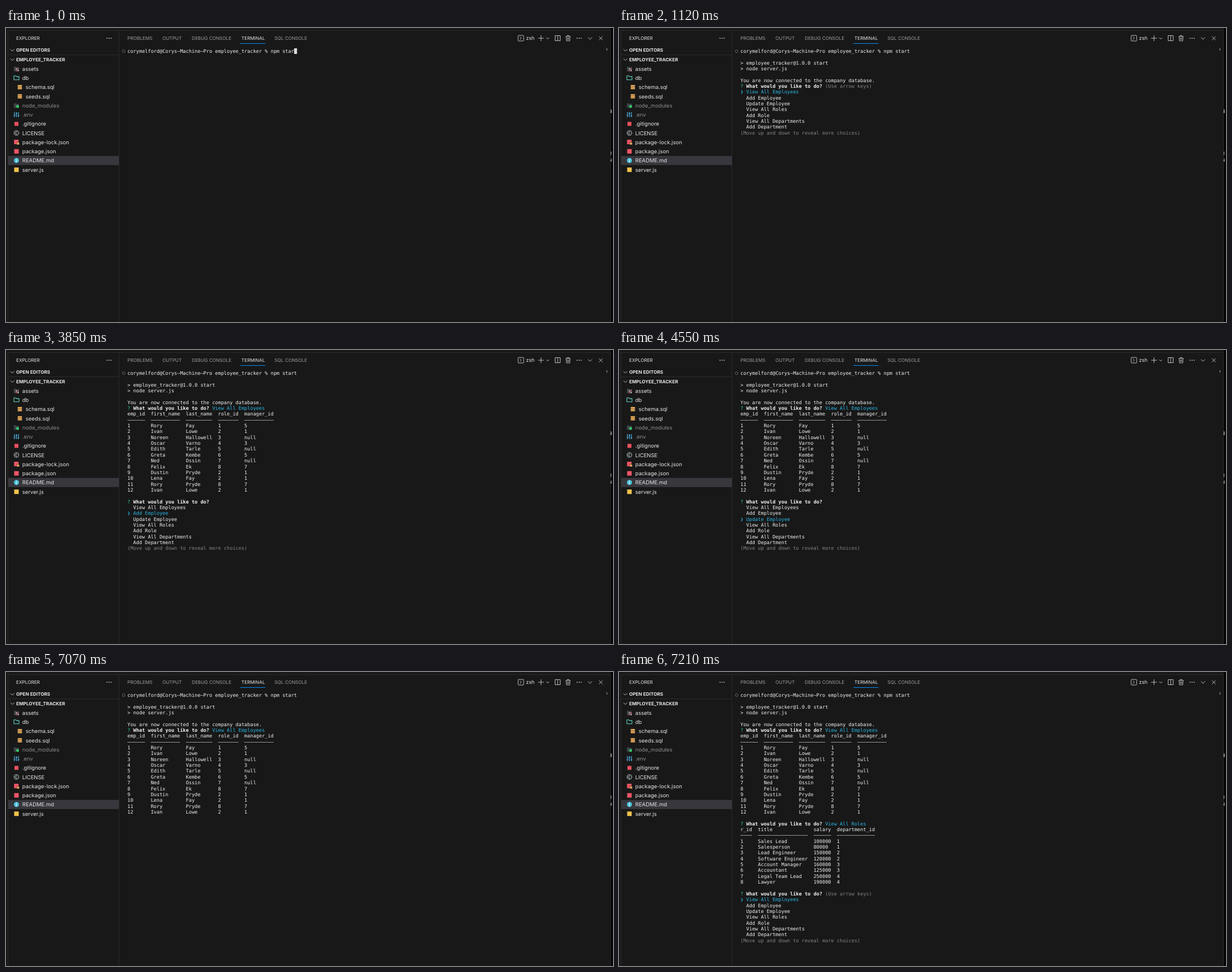
Animation of 1075 by 521 pixels, one loop 8 s. Source, as an HTML page:

```html
<!DOCTYPE html>
<html lang="en">
<head>
<meta charset="utf-8">
<title>Employee tracker terminal</title>
<style>
  html, body { margin: 0; width: 100%; height: 100%; overflow: hidden; background: #181818; }
  body { position: relative; text-rendering: geometricPrecision; }
  svg { position: absolute; left: 0; top: 0; }
  /* the tiny rotations keep baselines from snapping to whole pixels */
  svg text { font: 8.2px Inter, "Open Sans", sans-serif; fill: #e6e6e6; transform: rotate(.003deg); }
  svg .file { font-size: 9.5px; }
  svg .dim { fill: #8c8c8c; }
  svg .tab { fill: #9d9d9d; }
  svg .head { font-weight: 700; }
  .line { fill: none; stroke: #d0d0d0; stroke-width: .9; }
  .edge { fill: none; stroke: #2b2b2b; }
  pre {
    position: absolute; left: 215.2px; top: 35.8px; margin: 0; color: #f2f2f2;
    font: 43px/51.785px "DejaVu Sans Mono", monospace; font-variant-ligatures: none;
    transform: rotate(.003deg) scale(.2); transform-origin: 0 0;
  }
  .green { color: #23d18b; }
  .cyan { color: #29b8e8; }
  .gray { color: #858585; }
  .cursor { background: #dcdcdc; }
</style>
</head>
<body>
<svg width="1075" height="521" viewBox="0 0 1075 521">
  <rect x="1071" width="4" height="521" fill="#050505"/>
  <path class="edge" d="M3 4.5H1071M3.5 4V521M200 5V521M1070.5 4V521M4 47.5H200"/>
  <rect x="4" y="226.7" width="196" height="16.2" fill="#37373d"/>

  <text x="18" y="21.2">EXPLORER</text>
  <text class="head" x="18" y="42.3">OPEN EDITORS</text>
  <text class="head" x="18" y="58.9">EMPLOYEE_TRACKER</text>
  <path class="line" d="M8 37.7l3.3 3.3 3.3-3.3M8 54.3l3.3 3.3 3.3-3.3"/>
  <g id="files"></g>

  <!-- file icons -->
  <path d="M14 68.5h3.5l1 1H23v7h-9z M14 133.5h3.5l1 1H23v7h-9z" fill="#3c4448"/>
  <path d="M17.5 71.5h2v2h-2zM20.5 74.5h2v2h-2z" fill="#d8d8d8"/>
  <path d="M20.5 71.5h2v2h-2zM17.5 74.5h2v2h-2z" fill="#e0566b"/>
  <path d="M14 84.7h3.4l1.2 1.4H23v5.7h-9z" fill="none" stroke="#62d6c6" stroke-width="1.1"/>
  <g id="disks" fill="#f2b35e"></g>
  <circle cx="20.5" cy="139" r="2.5" fill="#35c96b"/>
  <path d="M15 149v9M18.5 149v9M22 149v9M13.5 155h3M17 151.5h3M20.5 155.5h3" fill="none" stroke="#4fb4e6" stroke-width="1.2"/>
  <rect x="15" y="166.4" width="7" height="7" fill="#e9505f"/>
  <circle cx="18.5" cy="186" r="4.1" fill="none" stroke="#c9d3da"/>
  <path d="M20 184.8a2 2 0 1 0 0 2.6" fill="none" stroke="#c9d3da"/>
  <rect x="14.3" y="198" width="8" height="8" fill="#ee5468"/>
  <path d="M19 203.2h4.5v3.6H19zM20 203v-1.2h2.5v1.2" fill="#f2b35e" stroke="#181818" stroke-width=".4"/>
  <rect x="14.5" y="214.6" width="8" height="8" fill="#ee5468"/>
  <circle cx="18.5" cy="234.8" r="4.5" fill="#4dc3dc"/>
  <path d="M18.8 231.8v1.1M18.6 233.8l-.4 3.6" stroke="#fff" stroke-width="1.1"/>
  <rect x="14.5" y="247.2" width="8" height="8" fill="#f0c24c"/>

  <!-- panel tabs -->
  <text class="tab" x="215" y="21.2">PROBLEMS</text>
  <text class="tab" x="277" y="21.2">OUTPUT</text>
  <text class="tab" x="329" y="21.2">DEBUG CONSOLE</text>
  <text x="417" y="21.2">TERMINAL</text>
  <text class="tab" x="475.5" y="21.2">SQL CONSOLE</text>
  <rect x="415" y="26.9" width="44.5" height="1.1" fill="#0a84e0"/>

  <!-- toolbar -->
  <g id="dots" fill="#d0d0d0"></g>
  <rect class="line" x="907" y="13.2" width="9.8" height="9.8" rx="1"/>
  <path class="line" d="M910.2 15.7l2.6 2.4-2.6 2.4"/>
  <text x="921" y="21.2" style="font-size:9px">zsh</text>
  <path class="line" d="M942.5 18.1h10M947.5 13.1v10M956.8 17l2.6 2.6 2.6-2.6"/>
  <path class="line" d="M972.5 13.5h9v9h-9zM977 13.5v9"/>
  <path class="line" d="M991 15h9M994 15v-1.6h3V15M992 15l.6 7.8h5.8L999 15M994.5 17v4M996.5 17v4"/>
  <path class="line" d="M1030.7 16.5l3.6 3.6 3.6-3.6M1050.2 15l6.4 6.4M1056.6 15l-6.4 6.4"/>
  <rect x="1063.2" y="36" width="2" height="4" fill="#666"/>
  <path d="M1071.5 144v4.5M1070 149h3M1072 145v6M1071.5 219v6M1070 235h3M1072 231v6" fill="none" stroke="#a8a8a8"/>
  <circle cx="208.4" cy="41" r="2.4" fill="none" stroke="#777" stroke-width=".8"/>
</svg>
<pre id="term"></pre>

<script>
const $ = id => document.getElementById(id);

// Sidebar rows: name, indent, dimmed
const files = [
  ['assets'], ['db'], ['schema.sql', 6], ['seeds.sql', 6], ['node_modules', 0, 1], ['.env', 0, 1],
  ['.gitignore'], ['LICENSE'], ['package-lock.json'], ['package.json'], ['README.md'], ['server.js']
];
$('files').innerHTML = files.map(([name, indent = 0, dim], i) =>
  `<text class="file${dim ? ' dim' : ''}" x="${28.8 + indent}" y="${75.7 + i * 16.27}">${name}</text>`).join('');
$('disks').innerHTML = [104.8, 121.1].map(y => [-2.7, 0, 2.7].map(d =>
  `<rect x="20.5" y="${y + d - 1.2}" width="8" height="2.2" rx="1.1"/>`).join('')).join('');
$('dots').innerHTML = [182.5, 1015].map(x => [-3.6, 0, 3.6].map(d =>
  `<circle cx="${x + d}" cy="18.2" r=".85"/>`).join('')).join('');

// Terminal pieces
const span = (cls, s) => `<span class="${cls}">${s}</span>`;
const cursor = span('cursor', ' ');
const ask = (tail = '') => `${span('green', '?')} <b>What would you like to do?</b> ${tail}\n`;
const options = ['View All Employees', 'Add Employee', 'Update Employee', 'View All Roles',
  'Add Role', 'View All Departments', 'Add Department'];

function menu(selected, hint) {
  const list = options.map((o, i) => i === selected ? span('cyan', '❯ ' + o) : '  ' + o).join('\n');
  return ask(hint ? span('gray', '(Use arrow keys)') : '') + list + '\n' +
    span('gray', '(Move up and down to reveal more choices)');
}

function table(text) {
  const rows = text.trim().split('\n').map(r => r.trim().split(','));
  const widths = rows[0].map((_, c) => Math.max(...rows.map(r => r[c].length)));
  rows.splice(1, 0, widths.map(w => '–'.repeat(w)));
  return rows.map(r => r.map((s, c) => s.padEnd(widths[c])).join('  ')).join('\n') + '\n\n';
}

const employees = table(`emp_id,first_name,last_name,role_id,manager_id
  1,Rory,Fay,1,5
  2,Ivan,Lowe,2,1
  3,Noreen,Hallowell,3,null
  4,Oscar,Varno,4,3
  5,Edith,Tarle,5,null
  6,Greta,Kembe,6,5
  7,Ned,Ossin,7,null
  8,Felix,Ek,8,7
  9,Dustin,Pryde,2,1
  10,Lena,Fay,2,1
  11,Rory,Pryde,8,7
  12,Ivan,Lowe,2,1`);

const roles = table(`r_id,title,salary,department_id
  1,Sales Lead,100000,1
  2,Salesperson,80000,1
  3,Lead Engineer,150000,2
  4,Software Engineer,120000,2
  5,Account Manager,160000,3
  6,Accountant,125000,3
  7,Legal Team Lead,250000,4
  8,Lawyer,190000,4`);

const prompt = 'corymelford@Corys–Machine–Pro employee_tracker % npm star';
const launched = prompt + 't\n\n&gt; employee_tracker@1.0.0 start\n&gt; node server.js\n\n';
const connected = launched + 'You are now connected to the company database.\n';
const listed = connected + ask(span('cyan', options[0])) + employees;

// Start time in ms and screen content
const screens = [
  [0, prompt + cursor],
  [280, prompt + 't' + cursor],
  [560, prompt + 't\n' + cursor],
  [770, launched + cursor],
  [1050, connected + menu(0, true)],
  [2800, listed + menu(0, true)],
  [3850, listed + menu(1)],
  [4550, listed + menu(2)],
  [6440, listed + menu(3)],
  [7070, listed],
  [7140, listed + ask(span('cyan', options[3])) + roles + menu(0, true)]
];

const start = performance.now();
let shown;
function draw() {
  const t = (performance.now() - start) % 8000;
  const screen = screens.findLast(([from]) => t >= from);
  if (screen !== shown) {
    shown = screen;
    $('term').innerHTML = screen[1];
  }
  requestAnimationFrame(draw);
}
draw();
</script>
</body>
</html>
```
